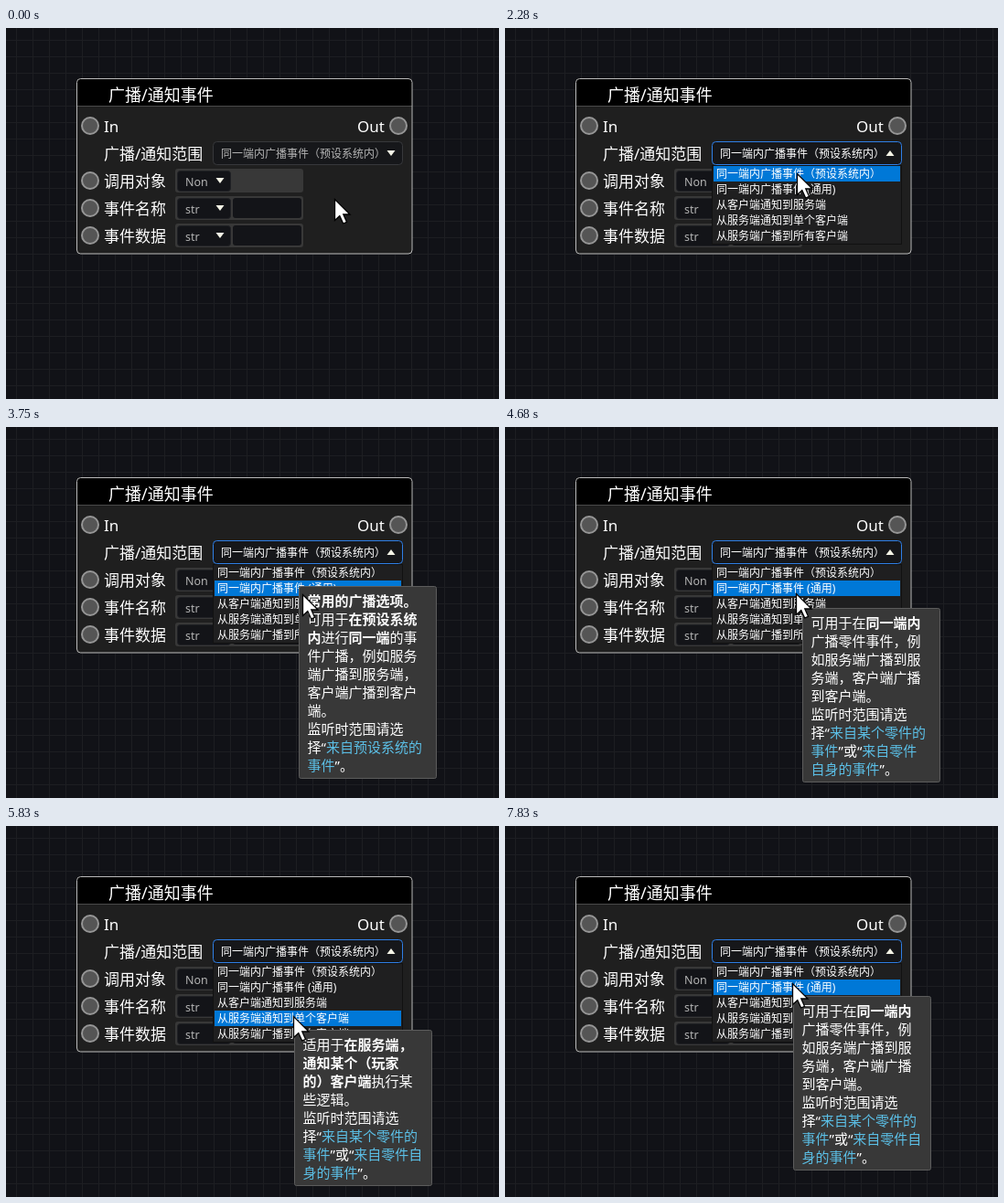
Animation of 539 by 406 pixels, one loop 8000 ms. Source, as an HTML page:

```html
<!DOCTYPE html>
<html lang="zh-CN">
<head>
<meta charset="utf-8">
<style>
html, body { margin: 0; width: 100%; height: 100%; overflow: hidden; background: #111217; }
svg { display: block; }
text { font-family: "Noto Sans", "Noto Sans CJK SC", sans-serif; white-space: pre; }
</style>
</head>
<body>
<svg id="stage" width="539" height="406" viewBox="0 0 539 406"></svg>
<script>
const stage = document.getElementById('stage');
const STEP = 70, LOOP = 8000, ROW = 17, LIST_TOP = 151;

// [start, steps, x, y] of each pointer move
const moves = [
  [730, 5, 325, 139], [2000, 5, 319, 159], [3540, 4, 324, 183], [4010, 3, 318, 180],
  [4680, 4, 317, 189], [5620, 4, 314, 208], [6420, 3, 313, 222], [7620, 4, 314, 172]
];
const options = ['同一端内广播事件（预设系统内）', '同一端内广播事件 (通用)', '从客户端通知到服务端',
  '从服务端通知到单个客户端', '从服务端广播到所有客户端'];

// Tooltip markup: * toggles bold, _ toggles link colour
const listen = '监听时范围请选\n择“_来自某个零件的\n事件_”或“_来自零件自\n身的事件_”。';
const sameEnd = '可用于在*同一端内*\n广播零件事件，例\n如服务端广播到服\n务端，客户端广播\n到客户端。\n';
const tips = [
  [3010, 320, 174, '*常用的广播选项。*\n可用于*在预设系统\n内*进行*同一端*的事\n件广播，例如服务\n端广播到服务端，\n客户端广播到客户\n端。\n监听时范围请选\n择“_来自预设系统的\n事件_”。'],
  [4010, 325, 198, sameEnd + listen.replace('自\n身', '\n自身')],
  [4890, 318, 204, '适用于*在客户端，\n通知服务端*执行某\n些逻辑。\n' + listen],
  [5830, 315, 223, '适用于*在服务端，\n通知某个（玩家\n的）客户端*执行某\n些逻辑。\n' + listen],
  [6560, 314, 235, '适用于*在服务端通\n知所有（玩家的）\n客户端* 都执行某些\n逻辑。\n' + listen],
  [7830, 315, 186, sameEnd + listen]
];

const rect = (x, y, w, h, fill, extra = '') =>
  `<rect x="${x}" y="${y}" width="${w}" height="${h}" fill="${fill}" ${extra}/>`;
const text = (s, x, mid, size, fill = '#fff', extra = '') =>
  `<text x="${x}" y="${mid + size * .37}" font-size="${size}" fill="${fill}" ${extra}>${s}</text>`;
const port = (x, y) => `<circle cx="${x}" cy="${y}" r="9" fill="#555" stroke="#969696" stroke-width="2"/>`;
const arrow = (x, y, extra = '') => `<path d="M${x - 4.5} ${y - 3}h9l-4.5 6z" fill="#f4f4e6" ${extra}/>`;

function field(label, y, value, hasEdit) {
  return port(92, y) + text(label, 107, y + 1, 17) +
    rect(185, y - 13, 140, 26, '#383838', 'rx="3"') +
    rect(187.5, y - 10.5, 58, 22, '#131418', 'rx="3" stroke="#202125"') +
    (hasEdit ? rect(248, y - 11, 75, 22, '#131418', 'rx="3"') : '') +
    text(value, 196, y + 1, 12.5, '#b4b4b4') + arrow(234, y);
}

function tooltip([, x, y, markup], i) {
  const lines = markup.split('\n');
  let bold = false, link = false, out = '';
  lines.forEach((line, n) => {
    const spans = line.split(/([*_])/).map(part => {
      if (part === '*') bold = !bold;
      else if (part === '_') link = !link;
      else if (part) return `<tspan font-weight="${bold ? 700 : 400}" fill="${link ? '#5bbfe6' : '#fff'}">${part}</tspan>`;
      return '';
    }).join('');
    out += text(spans, x + 9.5, y + 16 + n * 20, 15);
  });
  return `<g id="tip${i}">` + rect(x + .5, y + .5, 150, lines.length * 20 + 10, '#383838', 'rx="2" stroke="#5c5c5c"') + out + '</g>';
}

stage.innerHTML = `
  <defs>
    <pattern id="grid" width="18" height="18" patternUnits="userSpaceOnUse">
      <path d="M11.5 0V18M0 13.5H18" stroke="#1d1e22"/>
    </pattern>
    <clipPath id="reveal"><rect id="shown" x="226" y="150" width="209" height="88"/></clipPath>
  </defs>` +
  rect(0, 0, 539, 406, '#111217') + rect(0, 0, 539, 406, 'url(#grid)') +
  rect(77, 55, 367, 192, '#1f1f1f', 'rx="4"') +
  '<path d="M77 86V59q0-4 4-4h359q4 0 4 4V86z" fill="#000"/>' +
  rect(77, 85, 367, 1, '#4a4a4a') +
  rect(77.5, 55.5, 366.5, 191.5, 'none', 'rx="4" stroke="#b9b9b9"') +
  text('广播/通知事件', 112, 73, 18) +
  port(92, 107) + text('In', 107, 107.5, 17) +
  port(429, 107) + text('Out', 414, 107.5, 17, '#fff', 'text-anchor="end"') +
  text('广播/通知范围', 107, 138, 17) +
  rect(226.5, 124.5, 207, 25, '#16171a', 'id="combo" rx="4"') +
  text(options[0], 235, 138, 12, '#fff', 'id="value"') + arrow(421, 137, 'id="mark"') +
  field('调用对象', 167, 'Non', false) + field('事件名称', 197, 'str', true) + field('事件数据', 227, 'str', true) +
  '<g id="list" clip-path="url(#reveal)">' + rect(226.5, 150.5, 207, 86, '#1f1f20', 'stroke="#111"') +
  rect(228, LIST_TOP, 204, ROW, '#0078d7', 'id="hover"') +
  options.map((s, i) => text(s, 231, LIST_TOP + 9 + i * ROW, 12)).join('') + '</g>' +
  tips.map(tooltip).join('') +
  '<path id="pointer" d="M.5.5V23.5L5.8 18.5L9.7 27L13.5 25.3L9.8 17H17z" fill="#fff" stroke="#000" stroke-width="1.3"/>';

const el = id => document.getElementById(id);
const set = (id, attrs) => Object.entries(attrs).forEach(([k, v]) => el(id).setAttribute(k, v));
const progress = (t, start, steps) =>
  Math.max(0, Math.min(1, (Math.floor((t - start) / STEP) + 1) / steps));

function draw(t) {
  let x = 359, y = 187;
  for (const [start, steps, toX, toY] of moves) {
    const p = progress(t, start, steps);
    x += (toX - x) * p;
    y += (toY - y) * p;
  }
  x = Math.round(x);
  y = Math.round(y);
  set('pointer', { transform: `translate(${x} ${y})` });

  const open = t >= 1270, over = open || y < 150;
  set('combo', { stroke: open ? '#2f7fe6' : over ? '#555' : '#37383b' });
  set('value', { fill: over ? '#fff' : '#b4b4b4' });
  set('mark', { transform: open ? 'rotate(180 421 137)' : '' });
  set('shown', { height: 88 * progress(t, 1270, 3) });
  const row = Math.max(0, Math.min(4, Math.floor((y - LIST_TOP) / ROW)));
  set('hover', { y: LIST_TOP + row * ROW });

  tips.forEach(([start], i) => {
    const end = i + 1 < tips.length ? tips[i + 1][0] : LOOP;
    const visible = t >= start && t < end;
    set('tip' + i, { opacity: !visible ? 0 : i ? 1 : progress(t, start, 2) });
  });
}

const began = performance.now();
function tick() {
  draw((performance.now() - began) % LOOP);
  requestAnimationFrame(tick);
}
tick();
</script>
</body>
</html>
```
